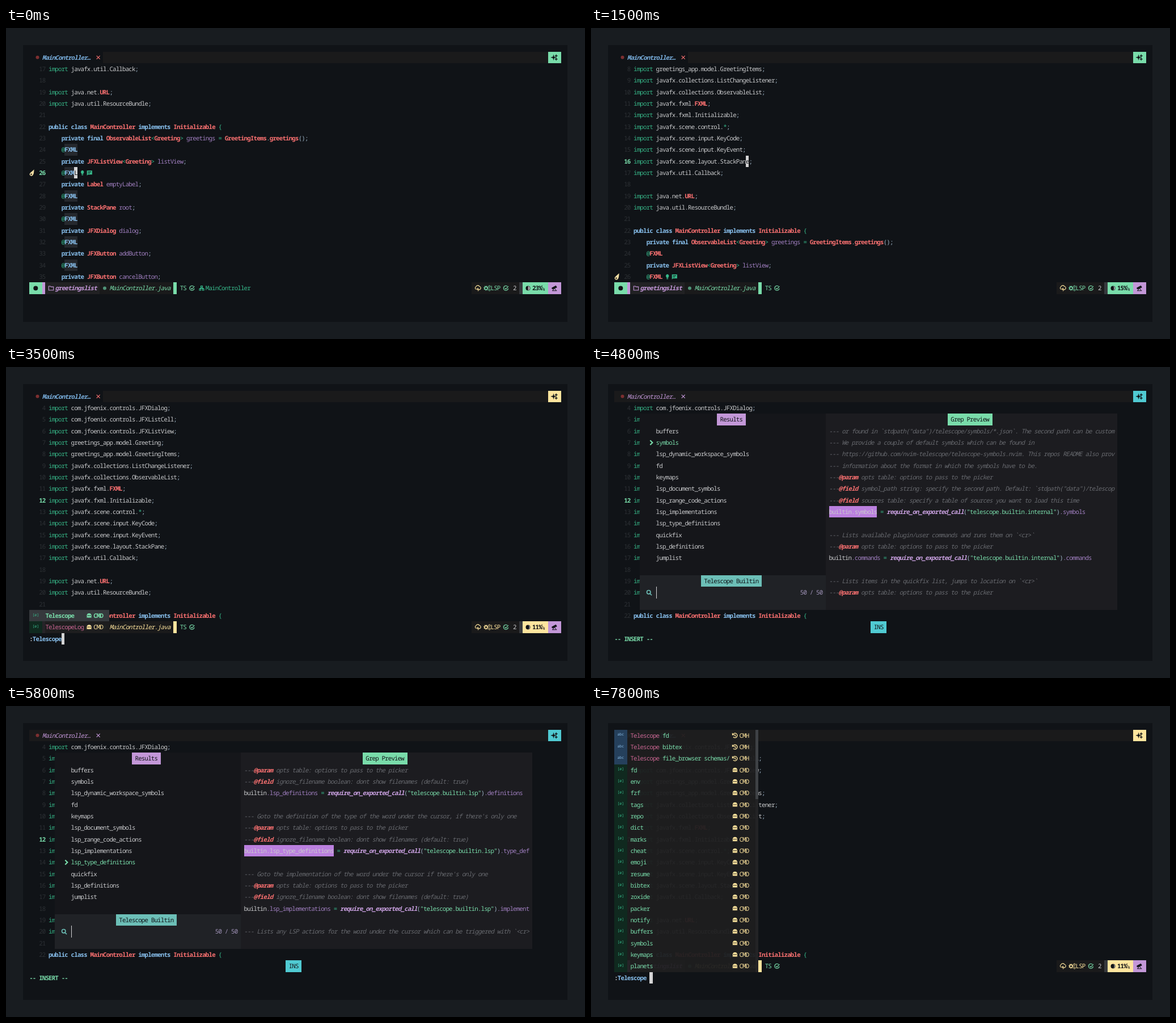
Write an HTML page that moves like this. It is 1021 px wide and 548 px high and loops after 8 s.

```html
<!DOCTYPE html>
<html lang="en">
<head>
<meta charset="utf-8">
<title>Editor session</title>
<style>
  html, body { margin: 0; width: 100%; height: 100%; overflow: hidden; background: #181c20; }
  svg { display: block; width: 100vw; height: 100vh; }
  rect { shape-rendering: crispEdges; }
  text {
    font-family: "Noto Sans Mono", "DejaVu Sans Mono", monospace;
    font-size: 10.8px; font-stretch: condensed; white-space: pre;
    text-rendering: geometricPrecision; fill: #c9cacc;
  }
  .tiny { font-size: 6.5px; letter-spacing: 0; text-anchor: middle; }
  .b { font-weight: 700; }
  .i { font-style: italic; }
  .num { fill: #2d3135; }
  .imp { fill: #36b285; }
  .kw { fill: #86bdea; font-weight: 700; }
  .type { fill: #f87070; font-weight: 700; }
  .op { fill: #37b98b; }
  .var { fill: #a07fc0; }
  .punc { fill: #9db4c6; }
  .dark { fill: #101317; }
  .green { fill: #79dcaa; }
  .yellow { fill: #ffe59e; }
  .purple { fill: #c397d8; }
  .blue { fill: #7ab0df; }
  .pink { fill: #c8648f; }
  .count { fill: #a093b8; }
  .note { fill: #67696e; font-style: italic; }
  .tag { fill: #f87070; font-style: italic; font-weight: 700; }
  .call { fill: #c9a0e0; font-style: italic; font-weight: 700; }
</style>
</head>
<body>
<svg id="stage" viewBox="0 0 1021 548" xmlns="http://www.w3.org/2000/svg"><text id="probe"></text></svg>
<script>
const LOOP = 8000;
const X0 = 41.2, Y0 = 41.7, CW = 5.648, RH = 20.33;
const C = {
  base: '#101317', bar: '#1a1a1b', bar2: '#212123', grey: '#36393d', light: '#d4d4d5',
  green: '#79dcaa', mint: '#37b98b', yellow: '#ffe59e', purple: '#c397d8', cyan: '#50cad2',
  teal: '#6cbfb7', red: '#f87070'
};

const code = `import com.jfoenix.controls.JFXDialog;
import com.jfoenix.controls.JFXListCell;
import com.jfoenix.controls.JFXListView;
import greetings_app.model.Greeting;
import greetings_app.model.GreetingItems;
import javafx.collections.ListChangeListener;
import javafx.collections.ObservableList;
import javafx.fxml.FXML;
import javafx.fxml.Initializable;
import javafx.scene.control.*;
import javafx.scene.input.KeyCode;
import javafx.scene.input.KeyEvent;
import javafx.scene.layout.StackPane;
import javafx.util.Callback;

import java.net.URL;
import java.util.ResourceBundle;

public class MainController implements Initializable {
    private final ObservableList<Greeting> greetings = GreetingItems.greetings();
    @FXML
    private JFXListView<Greeting> listView;
    @FXML
    private Label emptyLabel;
    @FXML
    private StackPane root;
    @FXML
    private JFXDialog dialog;
    @FXML
    private JFXButton addButton;
    @FXML
    private JFXButton cancelButton;`.split('\n');
const FIRST = 4;

const pickers = `buffers symbols lsp_dynamic_workspace_symbols fd keymaps lsp_document_symbols
lsp_range_code_actions lsp_implementations lsp_type_definitions quickfix lsp_definitions jumplist`.split(/\s+/);
const commands = `fd env fzf tags repo dict marks cheat emoji resume bibtex zoxide packer notify
buffers symbols keymaps planets`.split(/\s+/);

// "# " comment, "@" field, "P" shared param line, "=name module" definition
const docs = `# Search for files (respecting .gitignore)
P
@field cwd string: root dir to search from (default: cwd, use utils.buffer_dir() to search relative to open buffer)
@field hidden boolean: determines whether to show hidden files or not (default: false)
=find_files files

# This is an alias for the \`find_files\` picker
=fd

# Lists function names, variables, and other symbols from treesitter queries
P
@field show_line boolean: if true, shows the row:column that the result is found at (default: true)
@field bufnr number: specify the buffer number where treesitter should run. (default: current buffer)
=treesitter files

# Lists symbols inside of data/telescope-sources/*.json found in your runtime path
# or found in \`stdpath("data")/telescope/symbols/*.json\`. The second path can be customized.
# We provide a couple of default symbols which can be found in
# https://github.com/nvim-telescope/telescope-symbols.nvim. This repos README also provides more
# information about the format in which the symbols have to be.
P
@field symbol_path string: specify the second path. Default: \`stdpath("data")/telescope/symbols/*.json\`
@field sources table: specify a table of sources you want to load this time
=symbols internal

# Lists available plugin/user commands and runs them on \`<cr>\`
P
=commands internal

# Lists items in the quickfix list, jumps to location on \`<cr>\`
P
@field ignore_filename boolean: dont show filenames (default: true)
=quickfix internal

# Lists items from the current window's location list, jumps to location on \`<cr>\`
P
@field ignore_filename boolean: dont show filenames (default: true)
=loclist internal

# Lists open buffers in current neovim instance, opens selected buffer on \`<cr>\`
P
@field show_all_buffers boolean: if true, show all buffers, including unloaded buffers (default: true)
@field ignore_current_buffer boolean: if true, don't show the current buffer in the list (default: false)
@field only_cwd boolean: if true, only show buffers in the current working directory (default: false)
@field sort_lastused boolean: Sorts current and last buffer to the top and selects the lastused
@field sort_mru boolean: Sorts all buffers after most recent used. Not just the current and last one
@field bufnr_width number: Defines the width of the buffer numbers in front of the filenames
=buffers internal

# Lists available colorschemes and applies them on \`<cr>\`
P
@field enable_preview boolean: if true, will preview the selected color
=colorscheme internal

# Lists vim marks and their value, jumps to the mark on \`<cr>\`
P
=marks internal

# Lists vim registers, pastes the contents of the register on \`<cr>\`
P
=registers internal

# Lists normal mode keymappings, runs the selected keymap on \`<cr>\`
P
=keymaps internal

# Lists all available filetypes, sets currently open buffer's filetype to selected filetype
P
=filetypes internal

# Lists all available highlights
P
=highlights internal

# Goto the definition of the word under the cursor, if there's only one, otherwise show all options
P
@field ignore_filename boolean: dont show filenames (default: true)
=lsp_definitions lsp

# Goto the definition of the type of the word under the cursor, if there's only one
P
@field ignore_filename boolean: dont show filenames (default: true)
=lsp_type_definitions lsp

# Goto the implementation of the word under the cursor if there's only one
P
@field ignore_filename boolean: dont show filenames (default: true)
=lsp_implementations lsp

# Lists any LSP actions for the word under the cursor which can be triggered with \`<cr>\`
P
=lsp_code_actions lsp

# Lists any LSP actions for a given range, that can be triggered with \`<cr>\`
P
=lsp_range_code_actions lsp

# Lists LSP document symbols in the current buffer
# - Default keymaps:
#   - \`<C-l>\`: show autocompletion menu to prefilter your query by type of symbol you want to see
P
@field ignore_filename boolean: dont show filenames (default: true)
@field show_line boolean: if true, shows the content of the line the tag is found on (default: false)
@field symbols string|table: filter results by symbol kind(s)
@field ignore_symbols string|table: list of symbols to ignore
@field symbol_highlights table: string -> string. Matches symbol with hl_group
=lsp_document_symbols lsp

# Lists LSP document symbols in the current workspace
# - Default keymaps:
#   - \`<C-l>\`: show autocompletion menu to prefilter your query by type of symbol you want to see
P
@field query string: for what to query the workspace (default: "")
@field ignore_filename boolean: dont show filenames (default: false)
=lsp_workspace_symbols lsp

# Dynamically lists LSP for all workspace symbols
# - Default keymaps:
#   - \`<C-l>\`: show autocompletion menu to prefilter your query by type of symbol you want to see
P
@field ignore_filename boolean: dont show filenames (default: false)
@field show_line boolean: if true, shows the content of the line the symbol is found on
@field symbols string|table: filter results by symbol kind(s)
=lsp_dynamic_workspace_symbols lsp

# Lists diagnostics
# - Fields:
#   - \`All severity flags can be passed as \`string\` or \`number\` as per \`:vim.diagnostic.severity:\`
# - Default keymaps:
#   - \`<C-l>\`: show autocompletion menu to prefilter your query with the diagnostic you want to see
P`.split('\n');

// Timeline
const moves = [200, 400, 500, 600, 800, 900, 1000, 1200, 1300, 1500, 1700, 1800, 2000, 2100];
const scenes = [
  [0, {}],
  [3000, { cmd: ':' }], [3200, { cmd: ':T' }], [3400, { cmd: ':Tel', menu: 'short' }],
  [3500, { cmd: ':Telescope', menu: 'picked' }], [3800, {}], [3900, { pick: 0, loading: true }],
  ...[4000, 4800, 5000, 5200, 5300, 5500, 5600, 5700, 5800, 6000].map((t, i) => [t, { pick: i }]),
  [6300, { pick: 9, leaving: true }], [6400, {}],
  [6800, { cmd: ':' }], [7100, { cmd: ':T' }], [7200, { cmd: ':Tel', menu: 'short' }],
  [7300, { cmd: ':Telescope', menu: 'picked' }], [7700, { cmd: ':Telescope ' }],
  [7800, { cmd: ':Telescope ', menu: 'long' }]
];

// Cell grid helpers
const px = c => X0 + c * CW;
const py = r => Y0 + r * RH;
const mid = r => py(r) + RH / 2;
const esc = s => s.replace(/&/g, '&amp;').replace(/</g, '&lt;');
const text = (c, r, s, cls = '') => `<text x="${px(c).toFixed(2)}" y="${(py(r) + 14.1).toFixed(2)}" class="${cls}">${esc(s)}</text>`;
const box = (c, r, w, h, fill, extra = '') =>
  `<rect x="${px(c)}" y="${py(r)}" width="${w * CW}" height="${h * RH}" fill="${fill}" ${extra}/>`;
const tiny = (x, y, s, fill) => `<text x="${x}" y="${y}" class="tiny" style="fill:${fill}">${s}</text>`;

function run(col, row, tokens, limit = 999) {
  let out = '', used = 0;
  for (const [s, cls] of tokens) {
    const part = s.slice(0, Math.max(0, limit - used));
    if (part.trim()) out += text(col + used, row, part, cls);
    used += s.length;
  }
  return out;
}

// Icons, drawn around their own centre
const star = (x, y, r) => `M${x} ${y - r}Q${x} ${y} ${x + r} ${y}Q${x} ${y} ${x} ${y + r}Q${x} ${y} ${x - r} ${y}Q${x} ${y} ${x} ${y - r}`;
const line = (d, w = 1.1) => k => `<path d="${d}" fill="none" stroke="${k}" stroke-width="${w}"/>`;
const solid = d => k => `<path d="${d}" fill="${k}" fill-rule="evenodd"/>`;
const icons = {
  dot: k => `<circle r="3" fill="${k}"/>`,
  mark: k => `<circle r="4" fill="${k}"/>`,
  close: line('M-3-3L3 3M3-3L-3 3', 1.2),
  sparkle: k => `<path d="${star(-1.5, 0, 4.5)}${star(3.2, -2.8, 2.4)}${star(3.2, 3, 2.4)}" fill="${k}" stroke="${k}" stroke-width=".7"/>`,
  folder: line('M-4.2-3.5h3l1 1.2h4.4v5.8h-8.4z'),
  check: line('M2.6-3.2A4.1 4.1 0 1 0 4 .4M-2-.4L-.2 1.6L4.4-3.4', 1.2),
  tree: line('M-1.5-3.8h3v2.6h-3zM-4 1.2h2.6v2.6h-2.6zM1.4 1.2h2.6v2.6h-2.6zM0-1.2V.2M-2.7 1.2V.2h5.4v1', 1.1),
  cloud: line('M-3 2A2.5 2.5 0 0 1-3.2-2.6A3.4 3.4 0 0 1 3-3A2.6 2.6 0 0 1 3.6 2M-1.5 0v3M.8-.5L-.2 2.2h1.6L.4 5M3 1.6v2', 1.1),
  gear: k => `<g fill="none" stroke="${k}"><circle cx="-2" r="2.4" stroke-width="1.4"/><circle cx="-2" r="3.7" stroke-width="1.2" stroke-dasharray="1.5 1.4"/><circle cx="4" cy="-3" r="1.6"/><circle cx="4" cy="3" r="1.6"/></g>`,
  scope: k => `<path d="M-4.5-.4L2.6-4.2L4.2-1.4L-3.4 1.6zM-.4.4L-3 4.4M.4.4L3.4 4.4M-4 4.4H4.4" fill="${k}" stroke="${k}" stroke-width="1"/>`,
  ghost: solid('M-4 4V-.2A4 4 0 0 1 4-.2V4L2.6 2.8L1.3 4L0 2.8L-1.3 4L-2.6 2.8zM-2.4-1.2v2h1.6v-2zM.8-1.2v2h1.6v-2z'),
  history: line('M-3.6-1.6A4 4 0 1 1-3 2.6M-4.4-4v3h3M0-2.2V.4L1.8 1.4', 1.3),
  bulb: solid('M0-4.4A3.2 3.2 0 0 1 1.6 1.2V2.4H-1.6V1.2A3.2 3.2 0 0 1 0-4.4M-1.4 3h2.8v1.4h-2.8z'),
  chat: solid('M-4.6-4H4.6V3H-2.6L-4.6 4.8zM-2.8-2.2v1h5.6v-1zM-2.8 0v1h3.6v-1z'),
  meteor: k => `<path d="M4-6C4 0 3 5.6-1 5.6A3 3 0 0 1-3.6 1.4C-2.4-1 1-3 4-6z" fill="${k}"/><circle cx="-1" cy="2.8" r="1.4" fill="#3a3428"/>`,
  search: line('M2.4-.8A3.2 3.2 0 1 1-4-.8A3.2 3.2 0 1 1 2.4-.8M1.4 1.6L4.6 4.8', 1.6),
  caret: line('M-2-4L2 0L-2 4', 2.2)
};
const icon = (name, x, r, fill) => `<g transform="translate(${x} ${mid(r)})">${icons[name](fill)}</g>`;

function moon(x, r, n) {
  const rx = 4 * (1 - n / 26);
  return `<g transform="translate(${x} ${mid(r)})"><circle r="4" fill="${C.base}"/>` +
    `<path d="M0-3.5A3.5 3.5 0 0 1 0 3.5A${rx} 3.5 0 0 0 0-3.5" fill="#fff" opacity=".62"/></g>`;
}

const keyword = /^(public|class|implements|private|final)$/;

function highlight(src, lit) {
  const words = src.match(/\w+|\W/g) || [];
  const isImport = words[0] === 'import';
  return words.map((w, i) => {
    if (w === 'import') return [w, 'imp'];
    if (keyword.test(w) || (lit && w === 'FXML')) return [w, 'kw'];
    if (/[<>=@{*]/.test(w)) return [w, 'op'];
    if (isImport) return [w, /^[A-Z]{2,}$/.test(w) ? 'type' : w === ';' ? 'punc' : ''];
    if (/^[A-Z]/.test(w) || (/\w/.test(w) && words[i + 1] === '(')) return [w, 'type'];
    return [w, /\w/.test(w) ? 'var' : 'punc'];
  });
}

function drawCode(s) {
  const top = Math.min(17, s.line - 8);
  let out = '';
  for (let row = 1; row < 20; row++) {
    const n = top + row - 1, src = code[n - FIRST], now = n === s.line;
    const lit = s.line === 26 && src.includes('@FXML');
    out += text(n < 10 ? 4 : 3, row, String(n), now ? 'green b' : 'num');
    if (lit) out += box(11, row, 4, 1, '#25282d');
    out += run(6, row, highlight(src, lit));
    if (n === 26) {
      out += icon('meteor', 45.5, row, '#f3dfa4') + icon('bulb', 134.7, row, C.mint) + icon('chat', 147.3, row, C.mint);
    }
    if (now && !s.cmd && s.pick === undefined) {
      const col = Math.max(0, Math.min(35, src.length - 1));
      out += box(6 + col, row, 1, 1, C.light) + text(6 + col, row, src.charAt(col), 'dark');
    }
  }
  return out;
}

function drawTabs(s, tone) {
  const away = s.pick !== undefined;
  return box(0, 0, 166, 1, C.bar) + (away ? '' : box(0, 0, 23, 1, C.base)) +
    icon('dot', 55.5, 0, '#7d2f30') +
    text(4, 0, 'MainController…', away ? 'i purple' : 'i b blue') +
    icon('close', 162.7, 0, away ? C.purple : C.red) +
    box(162, 0, 4, 1, tone) + icon('sparkle', 967, 0, C.base);
}

function drawStatus(s) {
  const r = 20, name = s.cmd ? 'yellow' : 'green', tone = C[name];
  const crumb = s.line >= 22 ? icon('tree', 345, r, C.mint) + text(55, r, 'MainController', 'op') : '';
  return box(0, r, 4, 1, tone) + icon('mark', 52.3, r, C.base) +
    box(4, r, 1, 1, C.purple) + box(5, r, 17, 1, C.bar2) + box(22, r, 23, 1, C.bar) +
    icon('folder', 79.5, r, C.purple) + text(8, r, 'greetingslist', 'i b purple') +
    icon('dot', 174, r, '#4f9277') + text(25, r, 'MainController.java', 'i ' + name) +
    box(45, r, 1, 1, tone) + text(47, r, 'TS', 'green') + icon('check', 328, r, C.green) + crumb +
    box(138, r, 15, 1, C.bar) + icon('cloud', 832, r, C.yellow) + icon('gear', 848.5, r, tone) +
    text(144, r, 'LSP', name) + icon('check', 881.5, r, C.green) + text(151, r, '2') +
    box(153, r, 1, 1, C.grey) + box(154, r, 8, 1, tone) + moon(920.5, r, s.line) +
    text(157, r, Math.ceil(s.line / 1.14) + '%', 'dark b') +
    tiny(946.2, mid(r), 'L', C.base) + tiny(948.4, mid(r) + 4.6, 'N', C.base) +
    box(162, r, 4, 1, C.purple) + icon('scope', 967, r, C.base);
}

function docLine(src) {
  if (!src) return [];
  if (src === 'P') src = '@param opts table: options to pass to the picker';
  if (src[0] === '#') return [['---' + src.slice(1), 'note']];
  if (src[0] === '@') {
    const [, tag, rest] = src.match(/^(@\w+)(.*)/);
    return [['---', 'note'], [tag, 'tag'], [rest, 'note']];
  }
  const [name, mod] = src.slice(1).split(' ');
  const head = [['builtin', ''], ['.' + name, 'var'], [' = ', 'op']];
  if (!mod) return [...head, ['builtin', ''], ['.find_files', 'var']];
  return [...head, ['require_on_exported_call', 'call'], ['(', 'punc'],
    [`"telescope.builtin.${mod}"`, 'green'], [')', 'punc'], ['.' + name.replace('lsp_', ''), 'var']];
}

function drawPreview(name) {
  const at = docs.findIndex(d => d.split(' ')[0] === '=' + name);
  let out = '';
  for (let d = -7; d <= 7; d++) {
    const tokens = docLine(docs[at + d]);
    if (!d) {
      out += box(67, 10, name.length + 8, 1, '#bb80df');
      tokens[1][1] = '';
    }
    out += run(67, 10 + d, tokens, 89);
  }
  return out;
}

function drawPicker(s, tone) {
  const title = (c, r, label, fill) => box(c, r, label.length + 2, 1, fill) + text(c + 1, r, label, 'dark');
  const list = pickers.map((p, i) => text(13, 3 + i, p, i === s.pick ? 'green' : '')).join('');
  return box(8, 2, 58, 14, '#15161a') + box(8, 16, 58, 3, '#202226') + box(66, 2, 91, 17, '#1c1c20') +
    title(32, 2, 'Results', C.purple) + title(104, 2, 'Grep Preview', C.green) + title(27, 16, 'Telescope Builtin', C.teal) +
    list + icon('caret', 106.3, 3 + s.pick, C.green) +
    icon('search', 102.5, 17, C.teal) + box(13, 17, .25, 1, C.light) + text(58, 17, '50 / 50', 'count') +
    (s.loading ? '' : drawPreview(pickers[s.pick])) +
    title(80, 20, s.leaving ? 'NOR' : 'INS', tone) + (s.leaving ? '' : text(0, 21, '-- INSERT --', 'green b'));
}

function menuRow(r, tokens, width, kind, picked) {
  const abc = kind === 'CMH', tone = picked ? 'green' : 'yellow';
  const label = width - 5;
  return box(0, r, width, 1, picked ? C.grey : '#1e1e1f', picked ? '' : 'opacity=".95"') +
    (picked ? '' : box(0, r, 4, 1, abc ? '#25405c' : '#10291f')) +
    tiny(52.3, mid(r) + .6, abc ? 'abc' : '[ø]', abc ? '#8cbde8' : C.mint) +
    run(5, r, tokens) + icon(abc ? 'history' : 'ghost', px(label) - 7.6, r, C[tone]) +
    text(label, r, kind, tone + (picked ? ' b' : ''));
}

function drawMenu(kind) {
  if (kind !== 'long') {
    const picked = kind === 'picked';
    return menuRow(19, [['Telescope', picked ? 'green b' : 'pink']], 25, 'CMD', picked) +
      menuRow(20, [['TelescopeLog', 'pink']], 25, 'CMD');
  }
  const past = ['fd', 'bibtex', 'file_browser schemas/'];
  return past.map((p, i) => menuRow(i, [['Telescope ', 'pink'], [p, 'green']], 44, 'CMH')).join('') +
    commands.map((c, i) => menuRow(i + 3, [[c, 'green']], 44, 'CMD')).join('') +
    box(44, 0, 1, 21, '#232325') + box(44, 0, 1, 6, '#3e4145');
}

function draw(s) {
  const picking = s.pick !== undefined;
  const tone = picking && !s.leaving ? C.cyan : s.cmd && s.cmd.length > 2 ? C.yellow : C.green;
  let out = `<rect width="1021" height="548" fill="#181c20"/><rect x="30" y="30" width="960" height="488" fill="${C.base}"/>`;
  out += drawTabs(s, tone) + drawCode(s) + (picking ? drawPicker(s, tone) : drawStatus(s));
  if (s.menu) out += drawMenu(s.menu);
  if (s.cmd) out += run(0, 21, [[':', 'b'], [s.cmd.slice(1), 'kw']]) + box(s.cmd.length, 21, 1, 1, C.light);
  return out;
}

// Fit the font's own advance to the cell grid
const stage = document.getElementById('stage');
const probe = document.getElementById('probe');
probe.textContent = '0'.repeat(50);
stage.style.letterSpacing = CW - probe.getComputedTextLength() / 50 + 'px';

let shown = '';
function tick() {
  const t = performance.now() % LOOP;
  const scene = scenes.filter(([at]) => at <= t).pop()[1];
  const state = { ...scene, line: 26 - moves.filter(m => m <= t).length };
  const key = JSON.stringify(state);
  if (key !== shown) {
    stage.innerHTML = draw(state);
    shown = key;
  }
  requestAnimationFrame(tick);
}
tick();
</script>
</body>
</html>
```
